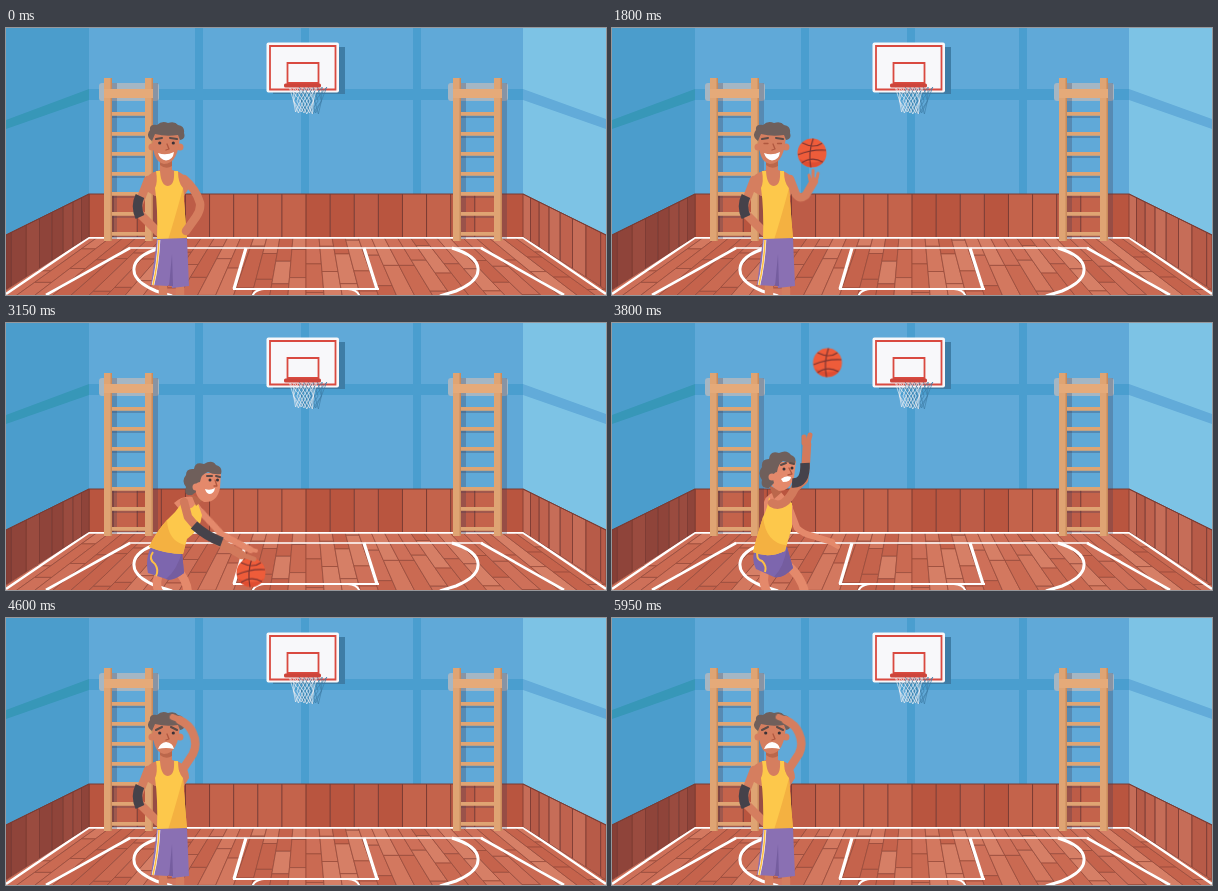
An HTML page that plays this animation: 600 by 267 pixels, repeating every 6 s.

```html
<!DOCTYPE html>
<html lang="en">
<head>
<meta charset="utf-8">
<title>Basketball practice</title>
<style>
html,body{margin:0;width:100%;height:100%;overflow:hidden;background:#5fa9d8}
svg{display:block;width:100%;height:100%}
.skin{fill:#d57e5f}.shade{fill:#bb674b}.hair{fill:#6f5f5b}
.shirt{fill:#fdc84b}.shirt2{fill:#f4b141}.shorts{fill:#8a70b3}.shorts2{fill:#755d9f}
.white{fill:#fff}.dark{fill:#3b3237}
.limb,.cuff,.line,.brow{fill:none;stroke-linecap:round;stroke-linejoin:round}
.limb{stroke:#d57e5f;stroke-width:8.5}
.cuff{stroke:#45424a;stroke-width:9.5;stroke-linecap:butt}
.low .skin{fill:#e4896b}
.low .limb{stroke:#e4896b}
.low .far{stroke-width:6.5}
.low .near{stroke:#d27a5c}
.low .shorts{fill:#7d66ae}
.brow{stroke:#5b4b48;stroke-width:2}
.line{stroke:#b0583f;stroke-width:1.3}
.seam{fill:none;stroke:#7b3a31;stroke-width:1}
.court{fill:none;stroke:#fff}
.tip{fill:none;stroke-linecap:round}

/* poses and props switch hard */
.stand,.hip,.finger,.rub,.happy,.sad,.open,.shut,.crouch,.back,.front,.shoot,#ball{animation:6s step-end infinite}
.stand{animation-name:stand}.hip{animation-name:hip}.finger{animation-name:finger}
.rub,.sad{animation-name:late}.happy{animation-name:early}
.open{animation-name:open}.shut{animation-name:shut}
.crouch{animation-name:crouch}.back{animation-name:early2}.front{animation-name:late2}
.shoot{animation-name:shoot}#ball{animation-name:ball}
@keyframes stand{0%{opacity:1}35%{opacity:0}75%,100%{opacity:1}}
@keyframes hip{0%{opacity:1}10%,100%{opacity:0}}
@keyframes finger{0%{opacity:0}10%{opacity:1}35%,100%{opacity:0}}
@keyframes late{0%{opacity:0}75%,100%{opacity:1}}
@keyframes early{0%{opacity:1}75%,100%{opacity:0}}
@keyframes open{0%,4.167%,17.5%,30.833%,100%{opacity:1}2.5%,15.833%,29.167%{opacity:0}}
@keyframes shut{0%,4.167%,17.5%,30.833%,100%{opacity:0}2.5%,15.833%,29.167%{opacity:1}}
@keyframes crouch{0%{opacity:0}35%{opacity:1}58.333%,100%{opacity:0}}
@keyframes early2{0%{opacity:1}49.167%,100%{opacity:0}}
@keyframes late2{0%{opacity:0}49.167%,100%{opacity:1}}
@keyframes shoot{0%{opacity:0}58.333%{opacity:1}75%,100%{opacity:0}}
@keyframes ball{0%{opacity:0}13.333%{opacity:1}75%,100%{opacity:0}}

/* ball flight: steady sideways, gravity up and down, spin on the finger */
#bx{animation:bx 6s linear infinite}
#by{animation:by 6s linear infinite}
#spin{animation:spin 6s linear infinite}
@keyframes bx{
0%{transform:translateX(200px);animation-timing-function:step-end}
35%{transform:translateX(245px);animation-timing-function:step-end}
58.333%,61.667%{transform:translateX(178px)}
62.5%{transform:translateX(190px)}
75%,100%{transform:translateX(565px)}}
@keyframes by{
0%,13.333%{transform:translateY(27px);animation-timing-function:cubic-bezier(.33,0,.67,.33)}
15%,19%{transform:translateY(125px)}
17%{transform:translateY(127px)}
34.99%{transform:translateY(125px)}
35%,38.333%,50%{transform:translateY(236px);animation-timing-function:cubic-bezier(.33,0,.67,.33)}
43.333%,55%{transform:translateY(290px);animation-timing-function:cubic-bezier(.33,.67,.67,1)}
48.333%,58.32%{transform:translateY(236px);animation-timing-function:linear}
58.333%,61.667%{transform:translateY(110px)}
62.5%{transform:translateY(100px);animation-timing-function:cubic-bezier(.33,.67,.67,1)}
67.75%{transform:translateY(-101px);animation-timing-function:cubic-bezier(.33,0,.67,.33)}
75%,100%{transform:translateY(282px)}}
@keyframes spin{0%,15%{transform:none}35%,100%{transform:rotate(1440deg)}}

/* arms */
.bob{transform-origin:178px 150px;animation:bob 6s ease-in-out infinite}
.scratch{transform-origin:177px 151px;animation:scratch .3s -125ms ease-in-out infinite alternate}
.push{transform-origin:197px 190px;animation:push 6s ease-in-out infinite}
.push2{transform-origin:181px 184px;animation:push2 6s ease-in-out infinite}
.drop{transform-origin:180px 188px;animation:drop 6s ease-out infinite}
.fling{transform-origin:169px 184px;animation:fling 6s ease-out infinite}
@keyframes bob{0%,15%,19%,23%,27%,31%,35%,100%{transform:none}17%{transform:rotate(4deg)}21%,25%,29%,33%{transform:rotate(1.5deg)}}
@keyframes scratch{to{transform:rotate(-3deg)}}
@keyframes push{0%,38.333%{transform:rotate(-15deg)}43.333%{transform:rotate(2deg)}48.333%,49.16%{transform:rotate(-15deg)}49.167%,100%{transform:rotate(-12deg)}}
@keyframes push2{0%,50%{transform:rotate(-9deg)}55%{transform:rotate(9deg)}58.333%,100%{transform:rotate(-9deg)}}
@keyframes drop{0%,61.667%{transform:rotate(-118deg)}63.333%,100%{transform:none}}
@keyframes fling{0%,61.667%{transform:rotate(-6deg)}63.333%,100%{transform:none}}
</style>
</head>
<body>
<svg viewBox="0 0 600 267" preserveAspectRatio="none">
<defs>
<clipPath id="floorClip"><path d="M0 262 83 209H517L600 262V267H0Z"/></clipPath>
<g id="ladder">
<rect x="-5" y="55" width="60" height="18" rx="3" fill="#a5b6c3"/>
<path d="M8 55h5v156h-5zM49 55h5v156h-5z" fill="#3f3b52" opacity=".28"/>
<g id="rungs"></g>
<path d="M0 50h8v163h-8zM41 50h8v163h-8z" fill="#dfa473"/>
<path d="M6.500 50h1.500v163h-1.500zM47.500 50h1.500v163h-1.500z" fill="#c98b5c"/>
<path d="M0 61h49v9H0z" fill="#e5aa79"/>
</g>
</defs>

<path d="M0 0H600V267H0Z" fill="#60a9d8"/>
<path d="M189 0h8v166h-8zM295 0h8v166h-8zM407 0h8v166h-8zM83 61h434v11H83z" fill="#4a9ecf"/>
<path d="M0 0H83V166L0 207Z" fill="#4b9dcc"/>
<path d="M0 92 83 61V72L0 101Z" fill="#3797b8"/>
<path d="M517 0h83V207L517 166Z" fill="#7dc3e5"/>
<path d="M517 61 600 91V101L517 72Z" fill="#62abd9"/>
<g id="panels"></g>
<g id="floor" clip-path="url(#floorClip)"></g>
<g class="court" clip-path="url(#floorClip)">
<path stroke-width="2.4" d="M0 266 83 209.500H517L600 266"/>
<path stroke-width="2.6" d="M40 267 124 220M475 220 558 267"/>
<path stroke-width="1.400" d="M123 220H477"/>
<path stroke-width="3.200" d="M240 220 228 261M358 220 371 261"/>
<path stroke-width="2" d="M227 261H373M246 270Q247 262 258 261M354 270Q353 262 342 261"/>
<path stroke-width="3" d="M154 220C121 230 119 250 150 263L166 268M446 220C479 230 481 250 450 263L434 268"/>
</g>

<use href="#ladder" x="98"/><use href="#ladder" x="447"/>

<path d="M267 19h72v47h-72z" fill="#3e7da6"/>
<rect x="260.500" y="14.500" width="72.500" height="50" rx="2" fill="#f8f8fa"/>
<path d="M264 18h65.500v43.500h-65.500zM281.500 35h31v20h-31z" fill="none" stroke="#d94a40" stroke-width="1.800"/>
<g id="net" fill="none"></g>
<rect x="278" y="55.500" width="37" height="4" rx="1.500" fill="#cd453b"/>

<g id="ball"><g id="bx"><g id="by"><g id="spin">
<circle r="14.500" fill="#ee5c3a"/>
<path d="M-13 6A14.500 14.500 0 0 0 13 6Q2 13-13 6" fill="#df4d31"/>
<path d="M-14 2Q0-4 14-3M1-14.500Q-4 0-1 14.500M-10-10Q2-4 10-10M-10 10Q0 3 11 9" fill="none" stroke="#7d3531" stroke-width="1.200"/>
</g></g></g></g>

<g class="stand">
<path class="limb" d="M157 255V270M174 255V270"/>
<path class="limb" d="M142 152 132 178Q131 184 135 187L152 204"/>
<path class="cuff" d="M134 168Q129 178 134 189"/>
<path class="skin" d="M137 161Q137 146 154 142V131h12v11Q183 145 183 160L178 168H149Z"/>
<path class="shade" d="M154 133h12v5Q160 142 154 137Z"/>
<path class="shirt" d="M150 143h4Q155 158 162 158Q169 157 168 143h4Q172 155 177 160L181 212H151Q152 180 149 160Q152 154 150 143Z"/>
<path class="shirt2" d="M177 160 181 212H162Q169 190 177 160Z"/>
<path class="shorts" d="M151 211 181 210 183 258 166 260 165 254 162 258 145 257Z"/>
<path class="shorts2" d="M166 226 167 258 163 258Z"/>
<path d="M153 212Q152 236 147 257" fill="none" stroke="#fff" stroke-width="2.600"/>
<path d="M153 212Q152 236 147 257" fill="none" stroke="#fdbf45" stroke-width="1.600"/>
<circle class="skin" cx="146" cy="119" r="3.500"/><circle class="skin" cx="174" cy="119" r="3.500"/>
<path class="skin" d="M147 105Q145 134 158 136Q173 136 174 105Z"/>
<path class="hair" d="M146 113Q139 108 144 102Q143 96 151 97Q156 92 162 95Q169 93 172 97Q179 98 178 105Q180 111 174 112L172 107Q160 109 149 106Z"/>
<path class="line" d="M161 116 163 121 160 122"/>
<g class="open"><circle class="dark" cx="153.700" cy="115" r="1.600"/><circle class="dark" cx="167.300" cy="115" r="1.600"/></g>
<g class="shut"><path class="line" d="M152 115.500h4M165.500 115.500h4"/></g>
<g class="happy"><path class="brow" d="M150 111 156 110M164 110 171 111"/><path class="white" d="M152 125Q160 128 168 124Q167 132 160 132.500Q154 132 152 125Z"/></g>
<g class="sad"><path class="brow" d="M150 112 156 109M165 109 171 112"/><path class="white" d="M152 131Q154 125 160 124Q167 125 168 131Q160 129 152 131Z"/></g>
<g class="hip"><path class="limb" d="M178 151Q190 161 194 175Q195 182 190 189L180 203"/></g>
<g class="finger"><g class="bob"><path class="limb" d="M178 151 184 166Q188 172 194 167L202 153"/><path class="limb" style="stroke-width:3" d="M201 152V142M205 150 206 145M198 152 197 147"/></g></g>
<g class="rub"><g class="scratch"><path class="limb" d="M177 151 187 136Q192 126 187 115Q184 107 174 102"/><path class="limb" style="stroke-width:6" d="M175 102 167 99"/></g></g>
</g>

<g class="crouch low">
<g class="push"><path class="limb far" d="M195 188 211 215 236 236"/><path class="limb far" style="stroke-width:4" d="M232 234 241 238"/></g>
<path class="limb" d="M155 248Q148 258 153 270M170 246Q181 256 182 270"/>
<path class="shorts" d="M145 224 176 229 178 250Q166 259 160 256L142 250Q139 236 145 224Z"/>
<path class="shorts2" d="M176 229 178 250Q166 259 160 256Q171 247 176 229Z"/>
<path d="M147 229Q142 236 149 241Q153 247 150 253" fill="none" stroke="#fdbf45" stroke-width="2"/>
<path class="skin" d="M168 180Q177 172 188 174L199 190 187 202Z"/>
<path class="shirt" d="M176 180Q184 192 191 178L196 192Q195 206 181 216L177 231Q160 231 143 224Q150 209 161 197Q170 189 176 180Z"/>
<path class="shirt2" d="M161 197Q150 209 143 224Q160 231 177 231L179 222Q162 218 161 197Z"/>
<path class="shade" d="M185 171 197 177 190 183Z"/>
<path class="skin" d="M190 151Q186 174 198 179Q211 180 214 165L215 149Z"/>
<path class="hair" d="M186 172Q177 173 180 164Q175 158 180 152Q180 145 188 146Q189 138 198 141Q206 136 210 142Q217 144 215 151Q208 152 202 149Q195 151 194 159Q187 160 190 169Z"/>
<circle class="skin" cx="190" cy="164" r="3.500"/>
<path class="brow" d="M201 153 206 153M210 153 214 154"/>
<circle class="dark" cx="204" cy="157" r="1.500"/><circle class="dark" cx="211.500" cy="157" r="1.500"/>
<path class="line" d="M209 157 211 163 208 163"/>
<path class="white" d="M199 166Q204 168 209 165Q208 171 203 171Q200 170 199 166Z"/>
<g class="back"><path class="limb near" d="M178 179Q158 182 145 191L134 211 131 234"/><path class="cuff" d="M156 184Q145 189 136 205"/></g>
<g class="front"><g class="push2"><path class="limb near" d="M178 179 182 194Q192 207 206 215L236 232"/><path class="cuff" d="M188 202Q200 213 216 219"/><path class="limb near" style="stroke-width:5" d="M232 230 248 236"/></g></g>
</g>

<g class="shoot low">
<g class="drop"><path class="limb far" d="M177 184 185 205Q191 211 201 213L220 219"/><path class="limb far" style="stroke-width:4" d="M217 219 226 224"/></g>
<path class="limb" d="M155 244Q148 258 156 270M173 240Q189 252 193 270"/>
<path class="shorts" d="M145 223 175 224 181 245Q171 256 162 254L144 246Q138 234 145 223Z"/>
<path class="shorts2" d="M175 224 181 245Q171 256 162 254Q172 244 175 224Z"/>
<path d="M146 227Q143 236 150 238Q155 243 153 249" fill="none" stroke="#fdbf45" stroke-width="2"/>
<path class="skin" d="M152 179Q155 169 168 168L181 183 179 200H152Z"/>
<path class="shirt" d="M157 174Q164 191 173 177Q176 176 180 180L180 204 173 228Q156 236 141 229Q145 213 151 194Q156 184 157 174Z"/>
<path class="shirt2" d="M151 194Q145 213 141 229Q156 236 173 228L174 222Q154 220 151 194Z"/>
<path class="shade" d="M157 162 170 169 162 176Z"/>
<path class="skin" d="M158 140Q153 162 167 168Q178 168 182 154L184 138Z"/>
<path class="hair" d="M157 165Q148 166 150 157Q145 150 150 144Q149 136 157 136Q158 127 167 130Q175 126 179 132Q185 134 183 141Q177 140 171 138Q166 141 165 149Q159 150 162 160Z"/>
<circle class="skin" cx="160" cy="154" r="3.500"/>
<path class="brow" d="M169 142 174 140M178 140 182 141"/>
<circle class="dark" cx="172" cy="146" r="1.500"/><circle class="dark" cx="180" cy="145" r="1.500"/>
<path class="line" d="M177 145 180 151 176 152"/>
<path class="white" d="M169 156Q174 152 179 154Q179 159 171 159Z"/>
<g class="fling"><path class="limb near" d="M160 180Q172 187 183 165L192 157 194 138 195 121"/><path class="cuff" d="M180 160Q194 161 193 140"/><path class="limb near" style="stroke-width:5" d="M192 120 192 114M196 120 198 112"/></g>
</g>
</svg>
<script>
const add = (id, html) => { document.getElementById(id).innerHTML += html; };
const path = (d, attrs) => `<path d="${d}" ${attrs}/>`;
let seed = 11;
const rand = () => (seed = seed * 16807 % 2147483647) / 2147483647;
const pick = list => list[Math.floor(rand() * list.length)];

// wall panels
const wood = ['#b9553f', '#c4634b', '#bd5c47'];
const panel = 434 / 18;
for (let i = 0; i < 18; i++) {
  const x = 83 + i * panel;
  add('panels', path(`M${x} 166h${panel}v43h${-panel}z`, `fill="${pick(wood)}"`) +
    path(`M${x} 166v43`, 'class="seam"'));
}
const side = (near, far, mirror, colors) => {
  const top = x => 207 - x * 41 / 83, low = x => 262 - x * 53 / 83;
  const px = x => mirror ? 600 - x : x;
  add('panels', path(`M${px(near)} ${top(near)}L${px(far)} ${top(far)}V${low(far)}L${px(near)} ${low(near)}Z`,
    `class="seam" style="fill:${pick(colors)};stroke-width:.8"`));
};
for (let x = 83, w = 7.5; x > 0; w += 1.2) {
  const next = Math.max(0, x - w);
  side(next, x, false, ['#8f443a', '#9a4b3f', '#863f36']);
  side(next, x, true, ['#bf624e', '#b75b48', '#c66d58']);
  x = next;
}
add('panels', path('M0 207 83 166H517L600 207', 'class="seam"'));

// floor boards run to a vanishing point above the centre
const boards = ['#ca6a52', '#d3785f', '#c5634c', '#d67f66', '#ce7059'];
const at = (x, y) => `${(300 + (x - 300) * (y - 60) / 149).toFixed(1)} ${y.toFixed(1)}`;
const board = 13;
for (let x = 53; x < 547; x += board) {
  for (let y = 209 - rand() * 22; y < 267;) {
    const end = y + 20 + rand() * 22;
    add('floor', path(`M${at(x, y)}L${at(x + board, y)}L${at(x + board, end)}L${at(x, end)}Z`,
      `fill="${pick(boards)}" stroke="#9c4d3c" stroke-width=".8"`));
    y = end;
  }
}

// ladder rungs
for (let y = 84; y < 210; y += 20) {
  add('rungs', path(`M8 ${y + 3.5}h36v2.500h-36z`, 'fill="#3f3b52" opacity=".28"') +
    path(`M7 ${y}h35v3.800H7z`, 'fill="#dfa473"'));
}

// net and its shadow
const mesh = (cx, slant) => {
  let d = '';
  for (let i = -3; i <= 3; i++) {
    for (const turn of [-1, 1]) {
      const mid = Math.max(-3, Math.min(3, i + turn * 2));
      d += `M${cx + i * 4.6} 59L${cx + mid * 3.3 - slant / 2} 73L${cx + i * 2.8 - slant} ${85 + i % 2}`;
    }
  }
  return d;
};
add('net', path(mesh(307, 3), 'stroke="#3f7ea8" stroke-width=".7"') +
  path(mesh(297, -1), 'stroke="#e8edf3" stroke-width=".7"'));
</script>
</body>
</html>
```
